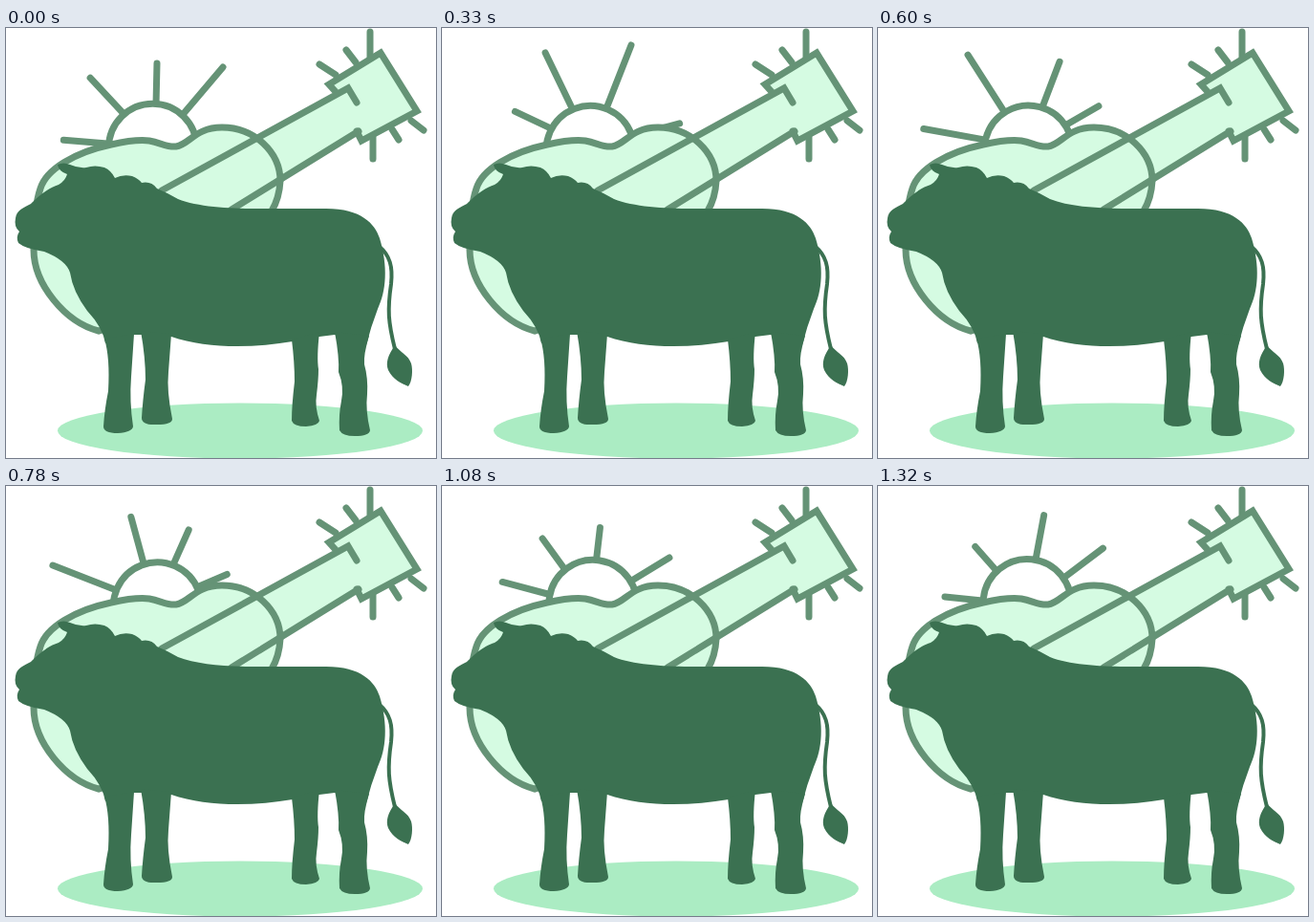
Recreate the animation shown at these times as an HTML page. Size 450 px wide and 450 px high, loop 1.35 s.

```html
<!DOCTYPE html>
<html lang="en">
<head>
<meta charset="utf-8">
<title>Bull, guitar and sun</title>
<style>
  html, body { margin: 0; width: 100%; height: 100%; overflow: hidden; background: #fff; }
  svg { display: block; width: 100%; height: 100%; }
  .line { fill: none; stroke: #659376; stroke-width: 7; stroke-linecap: round; stroke-linejoin: miter; }
  .mint { fill: #d5fbe2; }
  .bull { fill: #3b7151; }
</style>
</head>
<body>
<svg viewBox="0 0 450 450">
  <ellipse cx="245" cy="421.5" rx="191" ry="29" fill="#abecc3"/>

  <g id="sun" class="line">
    <g id="rays"></g>
    <circle cx="153.5" cy="125.2" r="46" fill="#fff"/>
  </g>

  <g class="line">
    <path class="mint" stroke="none" d="M163 170L347 69L337 59L392 26L430 87L372 118L367 108L236 190Z"/>
    <path class="mint" d="M97 317C62 308 29 268 29 232C29 205 31 182 36 168C42 148 72 130 110 122
      C128 118 142 117 150 118C162 120 168 125 178 124C192 122 198 104 226 104C260 104 287 130 287 160C286 180 278 200 255 215L150 300Z"/>
    <path d="M163 170L358 63L367 78M236 190L369 108M347 69L338 59L392 26L430 87L372 118L367 108"/>
    <path d="M381 4V31M356 23L366 36M328 38L345 49M384 137V114M411 117L404 106M437 107L424 97"/>
  </g>

  <g class="bull">
    <path d="M10 199C11 191 18 188 26 184C38 172 46 167 55 164Q62 160 64 153Q55 150 54 143Q60 140 67 143Q76 147 84 146
      Q93 143 103 146Q110 149 114 157Q122 153 132 155Q139 158 142 162Q152 160 158 168Q170 173 180 179
      C200 187 232 189 262 189L335 189C372 189 386 205 391 220C400 250 398 275 389 294Q382 312 377 332L344 321L328 323
      L300 328C260 335 210 336 173 323L142 321H133L104 330Q101 313 85 296Q70 276 67 256Q63 243 40 234
      Q20 231 13 225Q10 219 14 213Q8 208 10 199Z"/>
    <path d="M103 325Q109 345 107 380Q103 400 102 417Q102 424 117 424Q132 423 133 417Q129 390 131 365L134 320Z"/>
    <path d="M141 317Q146 345 146 368Q143 390 142 408Q142 416 158 415Q174 415 174 409Q168 380 170 360L173 320Z"/>
    <path d="M299 326Q302 350 302 370Q299 395 299 411Q301 417 314 417Q327 416 328 411Q323 396 325 384Q327 368 327 357Q325 345 328 318Z"/>
    <path d="M344 318Q349 345 348 360Q354 375 351 390Q348 405 349 421Q352 427 365 427Q380 427 381 421
      Q376 400 378 383Q379 366 375 352Q374 342 380 322Z"/>
    <path d="M407 332C400 342 397 350 400 358C405 368 414 372 421 375C425 370 426 358 424 351C421 342 413 340 407 332Z"/>
    <path d="M390 228C402 238 405 250 403 268C399 295 400 308 407 336" fill="none" stroke="#3b7151" stroke-width="4"/>
  </g>
</svg>
<script>
const LOOP = 1350, STEP = 30, DEG_PER_MS = 0.2;
const CX = 156, CY = 125, INNER = 47;
// Starting angle (counter-clockwise from the right) and outer radius of each ray
const RAYS = [[175.4, 96], [133, 99.5], [88.7, 88], [49.8, 110], [2.6, 115], [-50.8, 96], [-90, 86.5], [-132.6, 82]];

const sun = document.getElementById('sun');
document.getElementById('rays').innerHTML = RAYS.map(([angle, outer]) =>
  `<path d="M${INNER} 0H${outer}" transform="translate(${CX} ${CY}) rotate(${-angle})"/>`).join('');

// The disc sits slightly off the pivot, so it wobbles as the sun turns
function draw() {
  const t = Math.floor(performance.now() % LOOP / STEP) * STEP;
  sun.setAttribute('transform', `rotate(${-DEG_PER_MS * t} ${CX} ${CY})`);
  requestAnimationFrame(draw);
}
draw();
</script>
</body>
</html>
```
